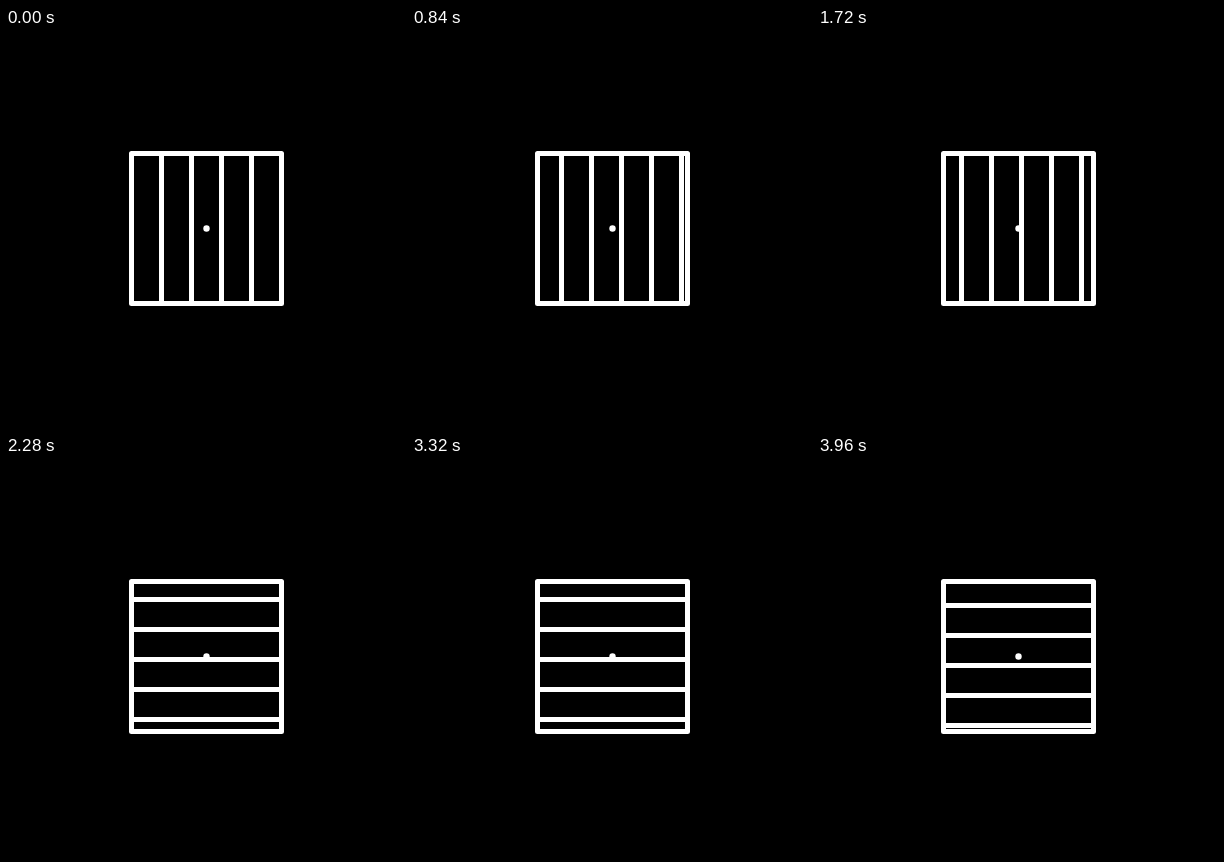
An HTML page without scripts for the animation above (4 s loop, 400 by 400 pixels).

```html
<!DOCTYPE html>
<html lang="en">
<head>
<meta charset="utf-8">
<title>Sliding bars</title>
<style>
  html, body { margin: 0; height: 100%; overflow: hidden; background: #000; }
  svg { display: block; width: 100%; height: 100%; }
  .line { fill: none; stroke: #fff; stroke-width: 5; stroke-linejoin: round; }

  /* The small negative delay keeps samples clear of the step edges. */
  .turn {
    transform-origin: 200.5px 200.5px;
    animation: turn 4s -2ms step-end infinite;
  }
  .slide { animation: slide 2s -2ms steps(25) infinite; }

  /* Upright bars first, then level ones. */
  @keyframes turn {
    0% { transform: rotate(0deg); }
    50%, 100% { transform: rotate(90deg); }
  }
  /* Out for one second, back for one second, 6px per step. */
  @keyframes slide {
    0%, 100% { transform: translateX(0); }
    50% { transform: translateX(-150px); }
  }
</style>
</head>
<body>
<svg viewBox="0 0 400 400">
  <defs>
    <clipPath id="window"><rect x="128" y="128" width="145" height="145"/></clipPath>
  </defs>
  <circle cx="200.5" cy="200.5" r="3.2" fill="#fff"/>
  <g clip-path="url(#window)">
    <g class="turn">
      <path class="line slide" d="M125.5 125v151m30 0v-151m30 0v151m30 0v-151m30 0v151m30 0v-151m30 0v151m30 0v-151m30 0v151m30 0v-151m30 0v151"/>
    </g>
  </g>
  <rect class="line" x="125.5" y="125.5" width="150" height="150"/>
</svg>
</body>
</html>
```
